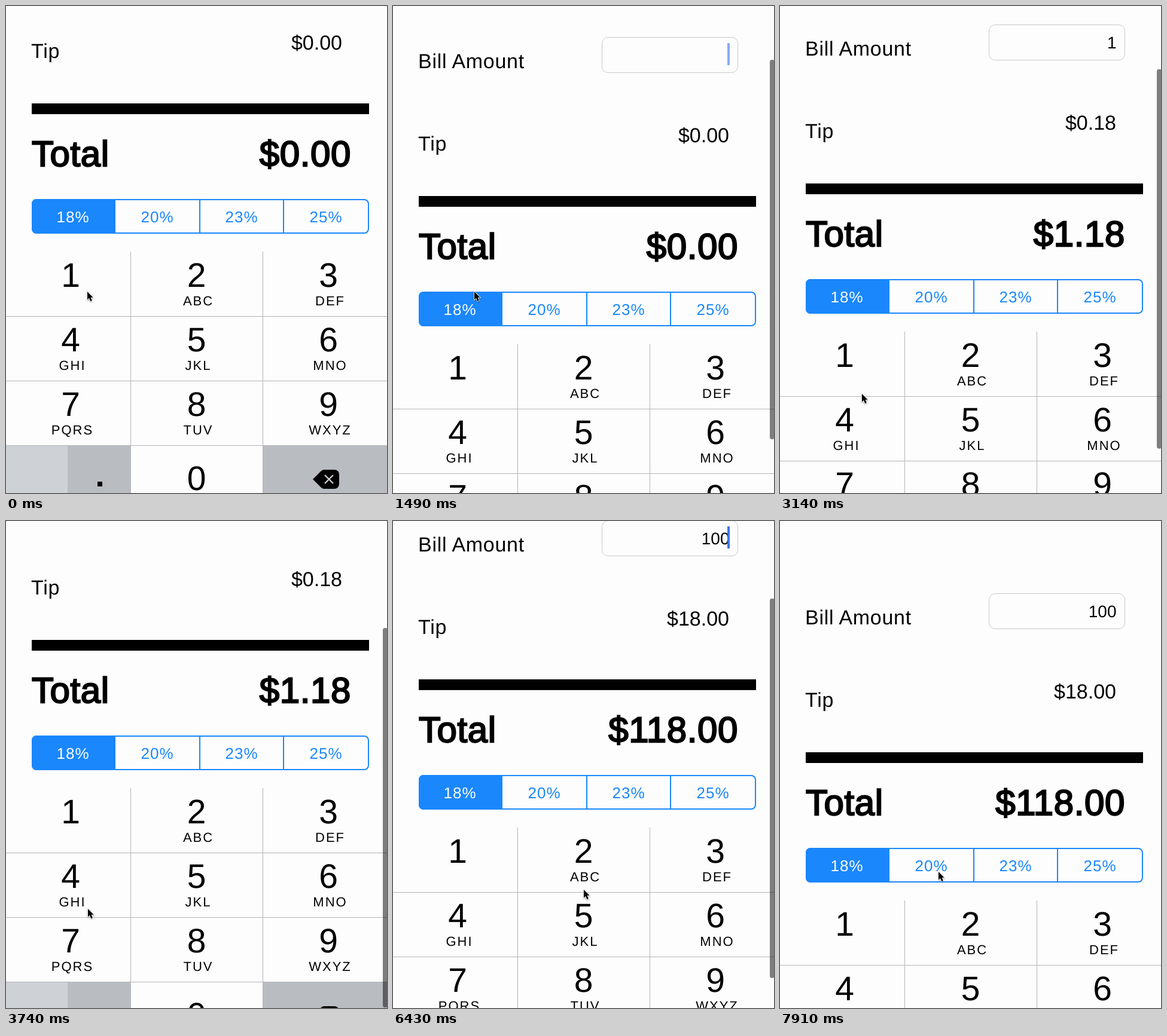
Animation of 637x815 px, one loop 8 s. Source, as an HTML page:

```html
<!DOCTYPE html>
<html lang="en">
<head>
<meta charset="utf-8">
<title>Tip calculator</title>
<style>
  html, body { margin: 0; width: 100%; height: 100%; overflow: hidden; background: #fdfdfd; }
  svg { display: block; width: 637px; height: 815px; font-family: "Liberation Sans", sans-serif; }
  .label { font-size: 34px; }
  .name { letter-spacing: .7px; }
  .total { font-size: 60px; letter-spacing: .6px; stroke: #000; stroke-width: 2.3; }
  .percent { font-size: 26px; letter-spacing: 1px; fill: #1a87fd; }
  .percent.on { fill: #fdfdfd; }
  .digit { font-size: 57px; }
  .letters { font-size: 22px; letter-spacing: 2px; }
  .middle { text-anchor: middle; }
  .end { text-anchor: end; }
  #pointer { filter: drop-shadow(0 1px 1px rgba(0, 0, 0, .4)); }
</style>
</head>
<body>
<svg viewBox="0 0 637 815" text-rendering="geometricPrecision">
  <g id="page">
    <text class="label name" x="42" y="-51">Bill Amount</text>
    <rect x="349.5" y="-102.5" width="227" height="59" rx="10" fill="#fdfdfd" stroke="#c8c8c8"/>
    <text id="bill" class="end" x="562.5" y="-63" font-size="28"></text>
    <rect id="caret" x="559" y="-93" width="4" height="37" fill="#3f74ee"/>

    <text class="label name" x="42" y="86.5">Tip</text>
    <text id="tip" class="label end" x="562" y="72.5"></text>
    <rect x="43" y="163" width="564" height="18"/>
    <text class="total" x="43" y="268">Total</text>
    <text id="total" class="total end" x="577" y="268"></text>

    <g id="segments">
      <path d="M183 323H51a8 8 0 0 0-8 8v42a8 8 0 0 0 8 8H183Z" fill="#1a87fd"/>
      <rect x="44" y="324" width="562" height="56" rx="7" fill="none" stroke="#1a87fd" stroke-width="2"/>
      <path d="M324 323V381M464 323V381" stroke="#1a87fd" stroke-width="2"/>
    </g>

    <g id="keys"></g>
    <path d="M0 735H103V850H0Z" fill="#ced2d7"/>
    <path d="M103 735H209V850H103ZM429 735H637V850H429Z" fill="#b9bdc2"/>
    <path d="M208.5 411V850M429.5 411V850M0 519.5H637M0 627.5H637M0 735.5H637" stroke="#b5b5b8"/>
    <rect x="153" y="796" width="8" height="8"/>
    <path d="M513 792L527 778Q529 776 532 776H549a8 8 0 0 1 8 8v16a8 8 0 0 1-8 8H532Q529 808 527 806Z"/>
    <path d="M533 785l14 14m0-14l-14 14" stroke="#c9ccd0" stroke-width="2.4"/>
  </g>
  <rect id="bar" x="630" width="8" height="635" rx="3.5"/>
  <path id="pointer" d="M0 0V13.5L3 10.8L5.2 16L7.8 14.9L5.6 9.8H9.6Z" stroke="#fff" stroke-width="1.6" paint-order="stroke"/>
</svg>
<script>
const LOOP = 8000;
const STEP = 149.5;
const LEAD = 15;
const $ = id => document.getElementById(id);

function add(parent, name, attrs, text = "") {
  const node = document.createElementNS("http://www.w3.org/2000/svg", name);
  for (const key in attrs) node.setAttribute(key, attrs[key]);
  node.textContent = text;
  parent.append(node);
  return node;
}

["18%", "20%", "23%", "25%"].forEach((text, i) =>
  add($("segments"), "text", { class: "percent middle" + (i ? "" : " on"), x: 112 + i * 141, y: 361.5 }, text));

const keys = {};

function addKey(digit, column, row, baseline, caption) {
  const top = 411 + row * 108;
  const center = 108 + column * 215.5 - (column === 1 ? 5 : 0);
  keys[digit] = add($("keys"), "rect", { x: column * 221 - 12, y: top, width: 220, height: 108, fill: "#fdfdfd" });
  add($("keys"), "text", { class: "digit middle", x: center, y: baseline }, digit);
  add($("keys"), "text", { class: "letters middle", x: center + 3, y: top + 90 }, caption);
}
["", "ABC", "DEF", "GHI", "JKL", "MNO", "PQRS", "TUV", "WXYZ"].forEach((caption, i) => {
  const row = Math.floor(i / 3);
  addKey(i + 1, i % 3, row, 470 + row * 108, caption);
});
addKey(0, 1, 3, 809.5, "");

const flicks = [
  { start: 450, end: 1890, to: 190 },
  { start: 2570, end: 4100, to: 11 },
  { start: 5980, end: 6975, to: 224 }
];
const glides = [
  { start: 1940, end: 2240, x: 137, y: 649 },
  { start: 4190, end: 4780, x: 304, y: 796 },
  { start: 5850, end: 6280, x: 319, y: 617 },
  { start: 7320, end: 7770, x: 265, y: 587 }
];
const taps = [
  { time: 2390, digit: "1" },
  { time: 4780, digit: "0" },
  { time: 5080, digit: "0" }
];

const clamp = value => Math.min(1, Math.max(0, value));
const smooth = p => p * p * (3 - 2 * p);
const dollars = value => "$" + value.toFixed(2);

// Chains eased moves of one property, each from where the last one ended.
const follow = (moves, property, from, t) => moves.reduce((value, move) =>
  value + (move[property] - value) * smooth(clamp((t - move.start) / (move.end - move.start))), from);

function barOpacity(t) {
  const flick = flicks.findLast(({ start }) => t > start);
  return flick ? .5 * clamp((flick.end + 600 - t) / 300) : 0;
}

const caretOpacity = t => clamp(.6 + 1.5 * Math.cos((t - 6430) / 940 * 2 * Math.PI));

function draw(now) {
  const t = Math.floor((now % LOOP + LEAD) / STEP) * STEP;
  const offset = Math.round(follow(flicks, "to", 0, t));
  const typed = taps.filter(tap => t >= tap.time + 150).map(tap => tap.digit).join("");
  const held = taps.find(tap => t >= tap.time && t < tap.time + 150);
  const x = follow(glides, "x", 136, t);
  const y = follow(glides, "y", 478, t);

  $("page").setAttribute("transform", `translate(0 ${offset})`);
  $("bar").setAttribute("y", 206 - .748 * offset);
  $("bar").setAttribute("opacity", barOpacity(t));
  $("caret").setAttribute("opacity", caretOpacity(t));
  $("pointer").setAttribute("transform", `translate(${x} ${y})`);
  $("bill").textContent = typed;
  $("tip").textContent = dollars(typed * .18);
  $("total").textContent = dollars(typed * 1.18);
  for (const digit in keys)
    keys[digit].setAttribute("fill", held?.digit === digit ? "#b9bdc2" : "#fdfdfd");
}

const start = performance.now();
function tick() {
  draw(performance.now() - start);
  requestAnimationFrame(tick);
}
tick();
</script>
</body>
</html>
```
